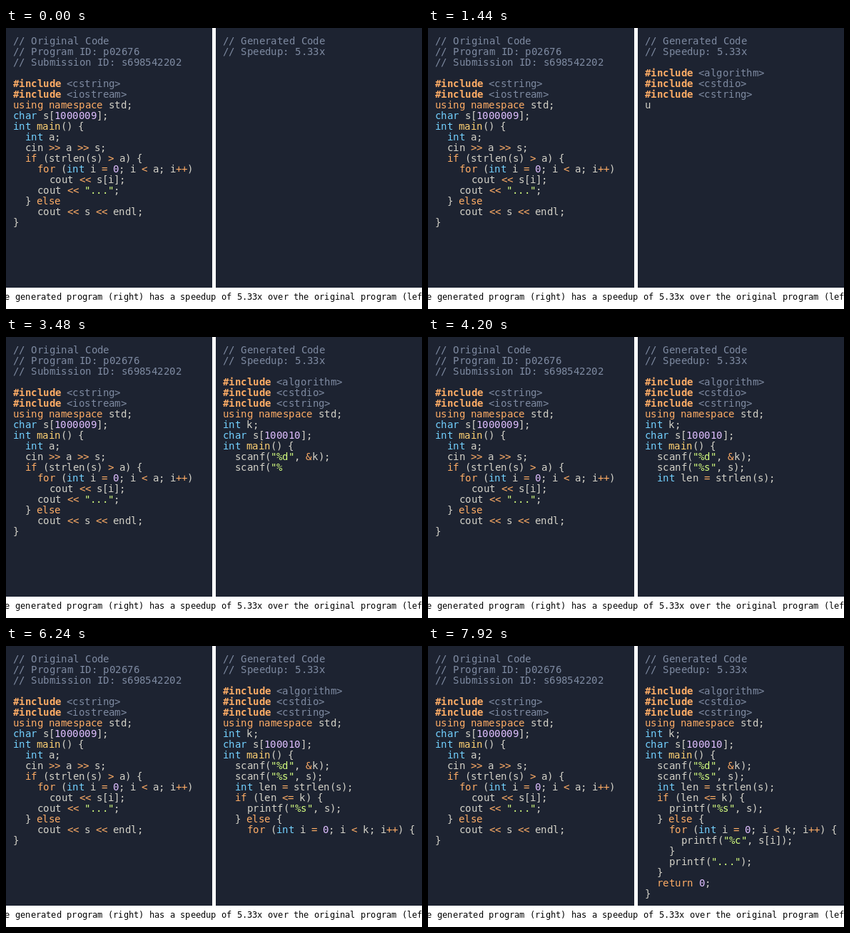
Animation, 583 px wide and 395 px high, one loop 8000 ms. Source, as an HTML page:

```html
<!DOCTYPE html>
<html lang="en">
<head>
<meta charset="utf-8">
<title>Code comparison</title>
<style>
  html, body { margin: 0; width: 100%; height: 100%; overflow: hidden; background: #fff; }
  svg { display: block; font: 14px "DejaVu Sans Mono", monospace; }
  .panel { fill: #1d2331; }
  .plain { fill: #d4d2c8; }
  .remark { fill: #7e8aa1; }
  .keyword { fill: #ffad66; }
  .preproc { fill: #ffad66; font-weight: bold; }
  .type { fill: #73d0ff; }
  .func { fill: #ffd173; }
  .number { fill: #dfbfff; }
  .string { fill: #d5ff80; }
  .caption { fill: #000; font-size: 12px; }
</style>
</head>
<body>
<svg width="583" height="395" viewBox="0 0 583 395">
  <rect class="panel" width="289" height="365"/>
  <rect class="panel" x="294" width="289" height="365"/>
  <g id="left"></g>
  <g id="right"></g>
  <g id="caption"></g>
</svg>
<script>
const LOOP = 8000, TICK = 120, CHARS_PER_TICK = 5;
const EM_ADVANCE = 1233 / 2048;
const SLASHES = "/".repeat(2);

const remarks = (...lines) => lines.map(line => `${SLASHES} ${line}\n`).join("") + "\n";

const leftHead = remarks("Original Code", "Program ID: p02676", "Submission ID: s698542202");
const rightHead = remarks("Generated Code", "Speedup: 5.33x");

const leftCode = `#include <cstring>
#include <iostream>
using namespace std;
char s[1000009];
int main() {
  int a;
  cin >> a >> s;
  if (strlen(s) > a) {
    for (int i = 0; i < a; i++)
      cout << s[i];
    cout << "...";
  } else
    cout << s << endl;
}`;

const rightCode = `#include <algorithm>
#include <cstdio>
#include <cstring>
using namespace std;
int k;
char s[100010];
int main() {
  scanf("%d", &k);
  scanf("%s", s);
  int len = strlen(s);
  if (len <= k) {
    printf("%s", s);
  } else {
    for (int i = 0; i < k; i++) {
      printf("%c", s[i]);
    }
    printf("...");
  }
  return 0;
}`;

const byId = id => document.getElementById(id);

// Glyphs sit on whole pixels.
function addText(parent, text, x, y, cls, size = 14) {
  const el = document.createElementNS("http://www.w3.org/2000/svg", "text");
  el.setAttribute("class", cls);
  el.setAttribute("x", [...text].map((_, i) => x + Math.round(i * size * EM_ADVANCE)).join(" "));
  el.setAttribute("y", y);
  el.textContent = text;
  parent.append(el);
}

// Tokens advance by whole pixels; lone "&" and "k" overhang by one.
function tokenWidth(text) {
  return /^[&k]$/.test(text) ? 9 : Math.round(text.length * 14 * EM_ADVANCE);
}

function classify(word) {
  if (/^(int|char)$/.test(word)) return "type";
  if (/^(using|namespace|for|if|else|return)$/.test(word)) return "keyword";
  if (word === "main") return "func";
  if (/^\d/.test(word)) return "number";
  return /^[<>=+&]$/.test(word) ? "keyword" : "plain";
}

function tokenize(line) {
  if (line.startsWith(SLASHES)) return [[line, "remark"]];
  if (line.startsWith("#")) {
    const include = line.match(/^(#include)( )(<\w+>)$/);
    return include
      ? [[include[1], "preproc"], [" ", "plain"], [include[3], "remark"]]
      : [[line, "preproc"]];
  }
  const words = line.match(/"[^"]*"?|\w+|\s+|./g) || [];
  return words.flatMap(word => word[0] === '"'
    ? word.match(/"|[^"]+/g).map(part => [part, "string"])
    : [[word, classify(word)]]);
}

function drawCode(parent, code, left) {
  parent.replaceChildren();
  code.split("\n").forEach((line, row) => {
    let x = left;
    for (const [text, cls] of tokenize(line)) {
      if (text.trim()) addText(parent, text, x, 23 + row * 15, cls);
      x += tokenWidth(text);
    }
  });
}

const caption = "The generated program (right) has a speedup of 5.33x over the original program (left)";
const captionWidth = caption.length * 12 * EM_ADVANCE;
addText(byId("caption"), caption, Math.round((583 - captionWidth) / 2), 382, "caption", 12);
drawCode(byId("left"), leftHead + leftCode, 10);

let shownTick = -1;
function draw() {
  const tick = Math.floor(performance.now() % LOOP / TICK);
  if (tick !== shownTick) {
    shownTick = tick;
    const typed = Math.max(0, tick * CHARS_PER_TICK - 1);
    drawCode(byId("right"), rightHead + rightCode.slice(0, typed), 304);
  }
  requestAnimationFrame(draw);
}
draw();
</script>
</body>
</html>
```
